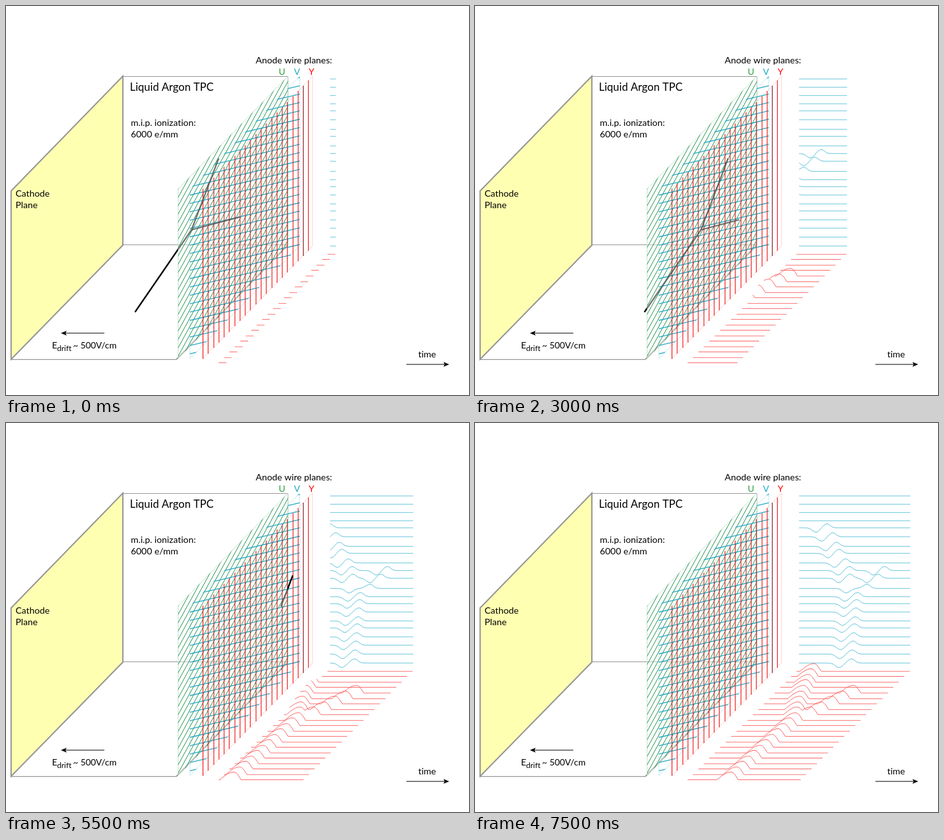
Animation of 725x610 px, one loop 8 s. Source, as an HTML page with a canvas:

```html
<!DOCTYPE html>
<html lang="en">
<head>
<meta charset="utf-8">
<style>
html, body { margin: 0; width: 725px; height: 610px; overflow: hidden; background: #fff; }
canvas { display: block; }
</style>
</head>
<body>
<canvas id="c" width="725" height="610"></canvas>
<script>
const g = document.getElementById('c').getContext('2d');
const GREEN = '#23914f', BLUE = '#1fa6c4', RED = '#f01c1c', GRAY = '#969696';
const SLOPE = 177 / 172, GAP = 13.1;
g.letterSpacing = '0.01px'; // keeps letters from joining into ligatures

function path(points, close) {
  g.beginPath();
  points.forEach(([x, y]) => g.lineTo(x, y));
  if (close) g.closePath();
}
function line(color, width, ...points) {
  path(points);
  g.strokeStyle = color;
  g.lineWidth = width;
  g.stroke();
}
function text(str, x, y, size = 14.3, color = '#000') {
  g.font = `${size}px Lato, "Open Sans", sans-serif`;
  g.fillStyle = color;
  g.fillText(str, x, y);
}
function arrow(x1, x2, y) {
  const s = Math.sign(x2 - x1);
  line('#000', 1.1, [x1, y], [x2 - 5 * s, y]);
  path([[x2, y], [x2 - 9 * s, y - 3.7], [x2 - 7 * s, y], [x2 - 9 * s, y + 3.7]], true);
  g.fillStyle = '#000';
  g.fill();
}

// Slanted wire plane with its left edge at x
const plane = (x, top) => [[x, top + 177], [x + 172, top], [x + 172, top + 266], [x, top + 443]];

function clipped(poly, draw) {
  g.save();
  path(poly, true);
  g.clip();
  draw();
  g.restore();
}
function border(poly, color) {
  path(poly, true);
  g.strokeStyle = color;
  g.lineWidth = 0.8;
  g.stroke();
}

function drawBox() {
  path([[8, 290], [183, 110], [183, 375], [8, 554]], true);
  g.fillStyle = '#ffffb2';
  g.fill();
  g.strokeStyle = GRAY;
  g.lineWidth = 2;
  g.stroke();
  line(GRAY, 1.2, [183, 110.5], [441.5, 110.5], [441.5, 375]);
  line(GRAY, 1.1, [183, 374.5], [441, 374.5]);
  line(GRAY, 1.3, [8, 554.3], [267, 554.3]);
  line(GRAY, 2, [267, 554], [441, 375]);
}

const clamp = v => Math.max(0, Math.min(1, v));

// The track is black in the open and gray between the edges of the first plane
const trackColor = g.createLinearGradient(269, 0, 441, 0);
trackColor.addColorStop(0, '#000');
trackColor.addColorStop(0, 'rgba(80,80,80,.8)');
trackColor.addColorStop(1, 'rgba(80,80,80,.8)');
trackColor.addColorStop(1, '#000');

// Three-armed track; each arm is absorbed when it reaches the wires
function drawTrack(k) {
  const dx = 10.55 * k, vertex = [290.5 + dx, 351];
  const arm = (x, y, from, to) => {
    if (to <= from) return;
    const at = f => [vertex[0] + f * (x + dx - vertex[0]), vertex[1] + f * (y - vertex[1])];
    line(trackColor, 2.3, at(from), at(to));
  };
  arm(202, 480, clamp((k - 8.3) / 2.3), 1);
  arm(333, 239, clamp((k - 8.3) / 4.8), 1);
  arm(366, 331, 0, clamp(1 - (k - 5.4) / 2.9));
}

function drawWires() {
  const u = plane(269.5, 110), v = plane(288, 110), y = plane(308, 110);
  path(u, true);
  g.fillStyle = 'rgba(255,255,255,.38)';
  g.fill();
  border(u, '#b5dcc0');
  border(v, '#b4e2ee');
  border(y, '#fbc4c4');
  clipped(u, () => {
    for (let i = 0; i < 31; i++) {
      const y0 = 288 + GAP * i;
      line(GREEN, 1, [269, y0], [442, y0 - 173 * 1.82]);
    }
  });
  clipped(v, () => {
    for (let i = 0; i < 31; i++) {
      const y1 = 112 + GAP * i;
      line(BLUE, 1.3, [288, y1 + 172 * 0.235], [460, y1]);
    }
  });
  for (let i = 0; i < 21; i++) {
    const x = Math.round(308 + 8.27 * i) + 0.5, top = 110 + (480 - x) * SLOPE;
    line(i == 19 ? '#7c1f2a' : RED, 1.15, [x, top], [x, top + 267]);
  }
}

const bump = (d, left, right) => Math.exp(-((d / (d < 0 ? left : right)) ** 2) / 2);
// Straight ramps that meet in a rounded tip
const ramp = (d, left, right) =>
  Math.sin(Math.PI / 2 * clamp(1 - Math.abs(d) / (d < 0 ? left : right)));

// Pulse positions are those of the last step; earlier steps lie further left
const bluePeaks = i => {
  if (i < 4) return [];
  if (i > 11) return [599 - 1.15 * (i - 12)];
  return [[551], [560], [566], [570], [580], [586, 641], [587, 631], [614]][i - 4];
};
function blueHeight(i, x) {
  const dip = i == 11 ? 33 : i > 11 ? 20 : 17;
  return bluePeaks(i).reduce((h, p) =>
    h + 6.5 * bump(x - p, 6.3, 5) - 7 * bump(x - p + dip, 5.5, 6.3), 0);
}
const redPeaks = j => {
  const peaks = [j > 8 ? 401 + 9.2 * (20 - j) : 505 + 26 * ((8 - j) / 8) ** 1.4];
  if (j > 3 && j < 9) peaks.push(593 - 16.8 * (j - 4));
  return peaks;
};
const redHeight = (j, x) =>
  Math.max(...redPeaks(j).map(p => 12 * ramp(x - p, 22, 11)));

function trace(color, x0, x1, y, height, shift) {
  const points = [];
  for (let x = x0; x <= x1; x++) points.push([x, y - height(x + shift)]);
  line(color, 0.9, ...points);
}
function drawTraces(k) {
  const shift = 11 * (15 - k);
  const rows = [114, 127, 140, 153, 164, 178, 193, 204, 219, 231, 243,
    259, 272, 283, 296, 310, 321, 335, 348, 362, 376];
  rows.forEach((y, i) =>
    trace('#35b4cf', 507.5, 516.5 + 11.03 * k, y + 0.4, x => blueHeight(i, x), shift));
  for (let j = 0; j < 21; j++) {
    const x0 = 503.5 - 8.53 * j, y = Math.round(388.85 + 8.53 * j) + 0.4;
    trace('#fb4a4a', x0, x0 + 12.5 + 11.03 * k, y, x => redHeight(j, x), shift);
  }
}

function drawLabels() {
  text('Liquid Argon TPC', 194, 133, 17);
  text('m.i.p. ionization:', 195.5, 188);
  text('6000 e/mm', 195.5, 206);
  text('Cathode', 15, 299);
  text('Plane', 15, 317);
  text('Anode wire planes:', 391, 90);
  text('U', 427, 107.5, 14, '#2f9e44');
  text('V', 451, 107.5, 14, BLUE);
  text('Y', 474, 107.5, 14, '#f00');
  text('E', 72, 537);
  text('drift', 80, 541, 12);
  text('~ 500V/cm', 105, 537, 13.9);
  text('time', 645.5, 551);
  arrow(154, 86, 513);
  arrow(627, 694, 562);
}

const start = performance.now();
function frame() {
  const k = Math.floor((performance.now() - start) % 8000 / 500);
  g.fillStyle = '#fff';
  g.fillRect(0, 0, 725, 610);
  drawBox();
  drawWires();
  drawTrack(k);
  drawTraces(k);
  drawLabels();
  requestAnimationFrame(frame);
}
frame();
</script>
</body>
</html>
```
